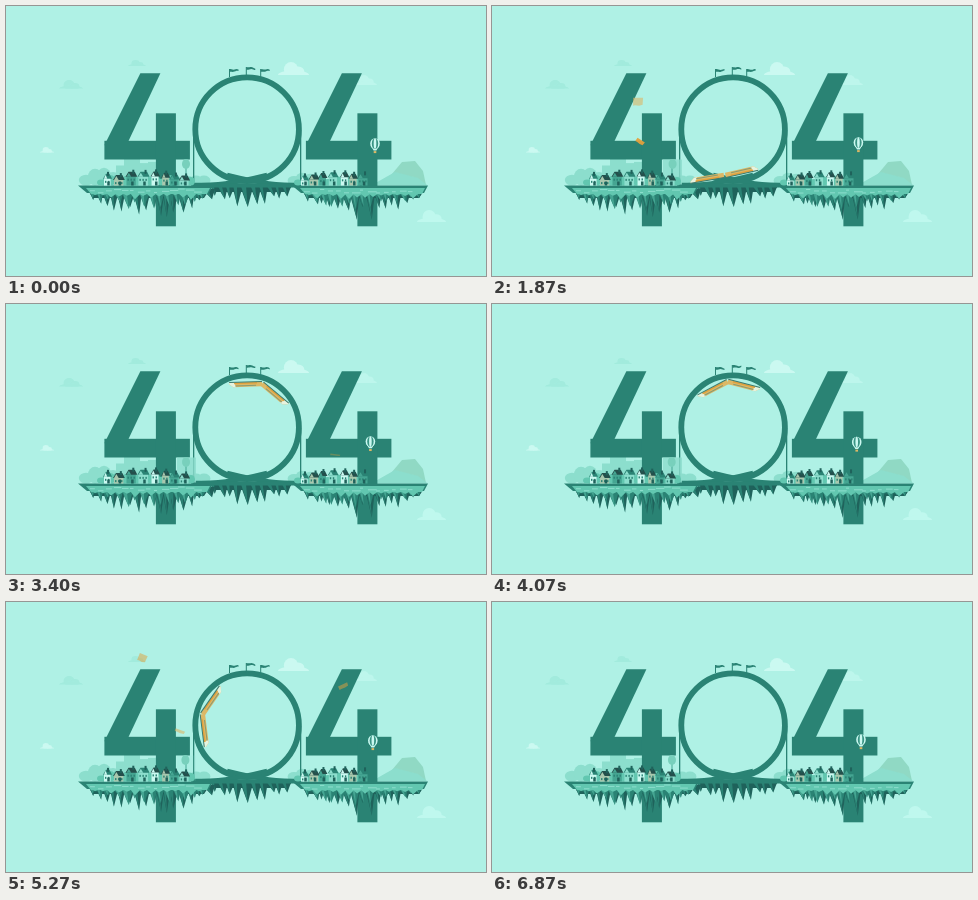
These frames come from a looping animation (480x270 px, 6.94 s). An HTML page with a canvas:

```html
<!DOCTYPE html>
<html lang="en">
<head>
<meta charset="utf-8">
<title>404</title>
<style>
html, body { margin: 0; width: 100%; height: 100%; overflow: hidden; background: #aff1e5; }
canvas { display: block; width: 480px; height: 270px; }
</style>
</head>
<body>
<canvas id="stage" width="480" height="270"></canvas>
<script>
const LOOP = 6940, FPS = 15, TAU = Math.PI * 2, GROUND = 179.5;
const SKY = '#aff1e5', MAIN = '#2a8374', DARK = '#1f625b', MID = '#45a592',
      SOFT = '#62c7b0', HILL = '#8cdecd', PALE = '#cbf9f1', ORANGE = '#e2a03c',
      TAN = '#dcb866';
const RING = { x: 241.1, y: 123.2, r: 51.8, rail: 48 };
const CAR = 41; // length along the loop in degrees

const stage = document.getElementById('stage');
const backdrop = document.createElement('canvas');
backdrop.width = 480;
backdrop.height = 270;
let g = backdrop.getContext('2d');

function random(seed) {
  return (lo, hi) => {
    seed = (seed * 16807) % 2147483647;
    return lo + (hi - lo) * seed / 2147483647;
  };
}

const clamp = v => Math.max(0, Math.min(1, v));

function poly(color, ...p) {
  g.fillStyle = color;
  g.beginPath();
  for (let i = 0; i < p.length; i += 2) g.lineTo(p[i], p[i + 1]);
  g.closePath();
  g.fill();
}

function rect(color, x, y, w, h) {
  g.fillStyle = color;
  g.fillRect(x, y, w, h);
}

function oval(color, x, y, rx, ry = rx) {
  g.fillStyle = color;
  g.beginPath();
  g.ellipse(x, y, rx, ry, 0, 0, TAU);
  g.fill();
}

function cloud(x, y, w, h, color) {
  g.save();
  g.beginPath();
  g.rect(x, y, w, h);
  g.clip();
  oval(color, x + w * .42, y + h * .58, w * .23, h * .58);
  oval(color, x + w * .66, y + h * .75, w * .19, h * .4);
  oval(color, x + w / 2, y + h, w / 2, h * .35);
  g.restore();
}

function four(x) {
  const y = 67.3;
  poly(MAIN, x + 36, y, x + 56, y, x + 24, y + 68, x, y + 72);
  rect(MAIN, x, y + 67.5, 85.5, 18.7);
  rect(MAIN, x + 51.5, y + 40, 20, 113);
}

function bushes(x1, x2, size, color, seed) {
  const r = random(seed);
  for (let x = x1; x < x2; x += size) {
    const h = size * r(.6, 1.1);
    oval(color, x, GROUND - h, size * .8, h);
  }
}

function towers(x1, x2) {
  const r = random(29);
  for (let x = x1; x < x2; x += 8) {
    const h = r(20, 28);
    rect(HILL, x, GROUND - h, 8, h);
  }
}

// Hanging spikes, longest in the middle, each with one lit side.
function rock(x1, x2, top, depth, color, lit, seed) {
  const r = random(seed);
  const reach = x => depth * (.4 + .6 * Math.sin(Math.PI * (x - x1) / (x2 - x1)));
  poly(color, x1, top, x2, top, x2 - 6, top + depth * .3, x1 + 6, top + depth * .3);
  for (let x = x1 + 1; x < x2 - 8;) {
    const w = r(9, 14), tip = x + w * r(.4, .8), y = top + reach(tip) * r(.6, 1.05);
    poly(color, x, top, x + w, top, tip, y);
    poly(lit, x + 1, top, x + w * .45, top, tip, y);
    x += w * .7;
  }
}

function island(x1, x2, seed) {
  const r = random(seed);
  rock(x1 + 9, x2 - 3, 183, 30, DARK, MAIN, seed);
  rock(x1 + 9, x2 - 3, 183, 21, MAIN, MID, seed + 7);
  poly(MAIN, x1, GROUND, x2, GROUND, x2 - 4, 187, x1 + 9, 187);
  poly(SOFT, x1 + 8, 182, x2 - 3, 182, x2 - 6, 188, x1 + 13, 188);
  for (let x = x1 + 12; x < x2 - 14; x += 8) {
    poly(SOFT, x, 187, x + 11, 187, x + 5, r(189, 194));
    rect(HILL, x, r(182, 187), r(3, 9), 1);
  }
}

function track() {
  g.strokeStyle = MAIN;
  g.lineWidth = 5.8;
  g.beginPath();
  g.arc(RING.x, RING.y, RING.r, 0, TAU);
  g.stroke();
  g.lineWidth = 4.5;
  for (const side of [-1, 1]) {
    const at = d => RING.x + side * d;
    g.beginPath();
    g.moveTo(at(56), 179);
    g.bezierCurveTo(at(30), 179, at(16), 178, at(-20), 169);
    g.stroke();
    rect(MAIN, at(53.5) - .6, 124, 1.3, 56);
  }
  rect(MAIN, 185, 177.3, 112, 4.2);
}

function paintBackdrop() {
  rect(SKY, 0, 0, 480, 270);
  cloud(272, 56, 31, 13, PALE);
  cloud(53, 74, 24, 8.5, '#a2ebdd');
  cloud(122, 54, 18, 6, '#a2ebdd');
  cloud(34, 141, 14, 5.5, PALE);
  cloud(349, 69, 22, 10, '#bdf6ec');
  cloud(411, 204, 29, 12, '#bff8ee');

  bushes(80, 112, 9, HILL, 5);
  bushes(182, 202, 8, HILL, 8);
  bushes(288, 312, 8, HILL, 3);
  towers(110, 144);
  poly('#90d9c4', 386, 168, 396, 156, 409, 155, 417, 165, 420, 179, 398, 179);
  poly(HILL, 366, 179, 389, 166, 412, 172, 421, 179);

  four(98.4);
  four(299.9);
  rock(203, 287, 179, 23, DARK, MAIN, 71);
  island(72, 207, 11);
  island(286, 422, 43);
  track();
}

function house(x, w, h, wall, roof) {
  const y = GROUND - h;
  rect(wall, x, y, w, h);
  poly(roof, x - 1, y + 1, x + 2, y - 4, x + w - 1, y - 4, x + w + 1.5, y + 1);
  poly(wall, x, y + 1, x + w * .25, y - 3, x + w * .5, y + 1);
  rect(DARK, x + w - 3.5, y - 6, 2, 4);
  for (let i = 1; i < w - 2; i += 3) rect(MAIN, x + i, y + 3, 1.4, 2);
  rect(DARK, x + w * .5, GROUND - 4, 2.5, 4);
}

function street(x1, x2, tall, seed) {
  const r = random(seed), walls = [PALE, '#a9c8ae', MID, HILL];
  bushes(x1 - 3, x2 + 4, 5, SOFT, seed);
  for (let x = x1, i = 0; x < x2; i++) {
    const w = r(6.5, 10);
    house(x, w, r(6, tall), walls[i % 4], i % 3 ? '#24504c' : MAIN);
    x += w + r(1, 4);
  }
}

function paintTown() {
  street(98, 186, 13, 17);
  street(295, 356, 10, 23);
}

// Time in ms and the train's nose in degrees from the loop's foot.
const RUN = [[1250, -70], [1870, 32], [2670, 139], [3400, 202], [4670, 253],
  [5800, 350], [6200, 424], [6650, 520]];

function slope(i) {
  const a = RUN[Math.max(i - 1, 0)], b = RUN[Math.min(i + 1, RUN.length - 1)];
  return (b[1] - a[1]) / (b[0] - a[0]);
}

function nose(t) {
  const i = RUN.findIndex(k => k[0] > t) - 1;
  if (i < 0) return null;
  const [t0, a] = RUN[i], [t1, b] = RUN[i + 1];
  const d = t1 - t0, u = (t - t0) / d, v = 1 - u;
  return v * v * (1 + 2 * u) * a + u * u * (3 - 2 * u) * b
    + d * u * v * (v * slope(i) - u * slope(i + 1));
}

function rail(deg) {
  const inLoop = Math.max(0, Math.min(360, deg));
  const a = inLoop * Math.PI / 180;
  const out = (deg - inLoop) * RING.rail * Math.PI / 180;
  return [RING.x + RING.rail * Math.sin(a) + out,
    RING.y + RING.rail * Math.cos(a) + 6 * clamp(Math.abs(out) / 40) ** 2];
}

function car(tail, head, leads) {
  const [x1, y1] = rail(tail), [x2, y2] = rail(head);
  const len = Math.hypot(x2 - x1, y2 - y1), end = leads ? len : 0, dir = leads ? -1 : 1;
  g.save();
  g.translate(x1, y1);
  g.rotate(Math.atan2(y2 - y1, x2 - x1));
  poly(TAN, len - end, 0, len - end, -4.8, end + dir * 4, -4.8, end, -1.5, end, 0);
  poly('#e6f3df', end, 0, end, -1.5, end + dir * 4, -4.8, end + dir * 7, -4.8, end + dir * 5, 0);
  rect(ORANGE, 5, -1.8, len - 10, 1.4);
  rect('#3d7a6d', 0, -.4, len, 1);
  rect('#8a9a70', 6, -4, len - 12, 1);
  g.restore();
}

function train(t) {
  const s = nose(t);
  if (s === null) return;
  g.save();
  g.beginPath();
  g.rect(189, 60, 105, 125);
  g.clip();
  car(s - 2 * CAR, s - CAR - 1, false);
  car(s - CAR + 1, s, true);
  g.restore();
}

// Time, place and tilt at which each drifting sheet is in mid-air.
const SHEETS = [[1870, 146, 96, 0], [1870, 148, 136, .6], [2670, 349, 110, 0],
  [4670, 190, 96, 0], [5800, 122, 86, .8], [5800, 323, 114, 0]];

function sheets(t) {
  SHEETS.forEach(([when, x, y, tilt], i) => {
    const d = (t - when) / 1000;
    if (d < -.6 || d > .76) return;
    g.save();
    g.globalAlpha = clamp((d + .6) * 8) * clamp((.76 - d) * 12) * (i % 3 ? .95 : .6);
    g.translate(x - 27 * d, y + 56 * d);
    g.rotate(tilt + Math.sin(d * 4) * .5);
    g.scale(1 - tilt * .2, Math.max(.2, Math.abs(Math.cos(tilt * 1.75 + d * 2))));
    poly(i % 3 ? ORANGE : TAN, -5, -4, 5, -4, 4.5, 3, 1, 4, -3, 3.5, -5, 4);
    g.restore();
  });
}

function flags(t) {
  for (const [x, y] of [[223.5, 63], [240.3, 61], [254.7, 63]]) {
    const wave = k => y + Math.sin(t / LOOP * TAU * 8 - k * .7 + x) * .8 * k / 9;
    rect(MAIN, x - .5, y, 1, 71 - y);
    g.fillStyle = MAIN;
    g.beginPath();
    for (let k = 0; k <= 9; k++) g.lineTo(x + k, wave(k) + k * .1);
    for (let k = 9; k >= 0; k--) g.lineTo(x + k, wave(k) + 2.8 - k * .06);
    g.fill();
  }
}

function balloon(t) {
  const a = t / LOOP * TAU;
  g.save();
  g.translate(366.7 + 2.3 * Math.cos(a), 137.6 - Math.sin(a));
  oval(PALE, 0, 0, 4.8, 5.4);
  poly(PALE, -4.3, 2, 4.3, 2, 1.4, 6.8, -1.4, 6.8);
  oval('#3a9484', 0, 0, 3.2, 5.4);
  oval(PALE, 0, 0, 1.3, 5.4);
  rect(TAN, -1.3, 7.5, 2.6, 2);
  g.restore();
}

function haze(t) {
  g.globalAlpha = .8 * clamp((t - 1200) / 500) * clamp((5400 - t) / 700);
  rect(HILL, 171, 153.5, 19, 25);
  g.globalAlpha = 1;
  rect(MID, 179.5, 158, 1, 21);
  oval('#78d0bc', 180 + Math.sin(t / LOOP * TAU) * .6, 158, 4, 5);
}

paintBackdrop();
g = stage.getContext('2d');

function draw(now) {
  const t = Math.floor(now % LOOP * FPS / 1000 + .06) * 1000 / FPS;
  g.drawImage(backdrop, 0, 0);
  haze(t);
  flags(t);
  sheets(t);
  train(t);
  paintTown();
  balloon(t);
}

const start = performance.now();
function tick() {
  draw(performance.now() - start);
  requestAnimationFrame(tick);
}
tick();
</script>
</body>
</html>
```
